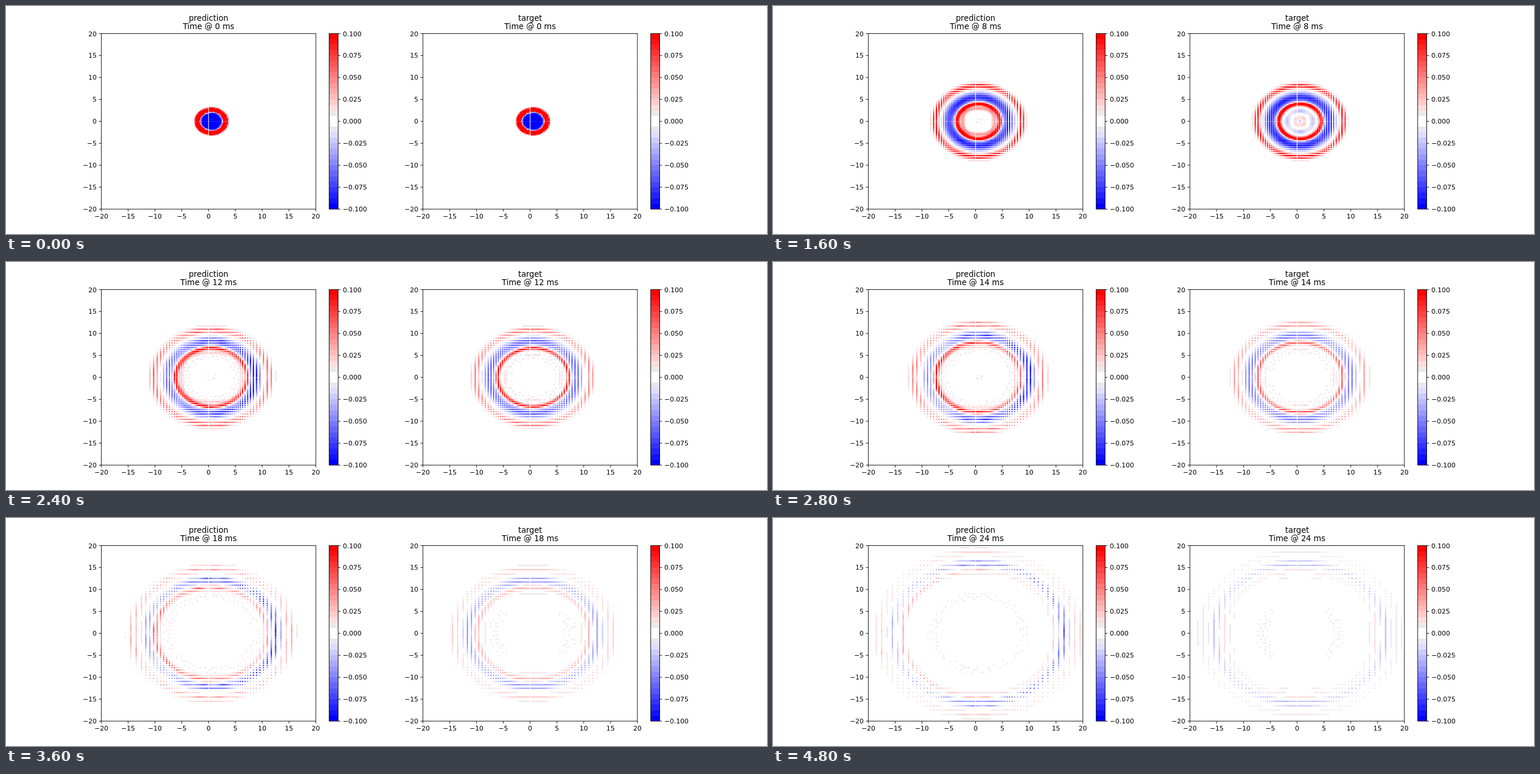
An HTML page with a canvas for the animation above (5 s loop, 1280 by 384 pixels).

```html
<!DOCTYPE html>
<html lang="en">
<head>
<meta charset="utf-8">
<title>Wave field: prediction and target</title>
<style>
  html, body { margin: 0; width: 100%; height: 100%; overflow: hidden; background: #fff; }
  canvas, svg { position: absolute; left: 0; top: 0; width: 1280px; height: 384px; }
  text { font-family: "DejaVu Sans", sans-serif; font-size: 11.05px; fill: #000; }
  .title { font-size: 13.26px; text-anchor: middle; }
  .line { fill: none; stroke: #000; stroke-width: .9; }
</style>
</head>
<body>
<canvas id="field" width="1280" height="384"></canvas>
<svg id="frame" viewBox="0 0 1280 384"></svg>
<script>
const STEP = 200, STEPS = 25;
const TOP = 46.4, HEIGHT = 295.7, WIDTH = 360.8;
const BANDS = 16, BAND = 0.1 / BANDS, DOT = 1.25;
const CX = 0.55;
const panels = [
  { name: 'prediction', left: 160.3, bar: 543.5, field: predicted },
  { name: 'target', left: 701.2, bar: 1084.3, field: simulated }
];

const ctx = document.getElementById('field').getContext('2d');
const svg = document.getElementById('frame');
const { exp, sin, cos, abs, min, max, hypot, atan2, sign, pow, floor } = Math;

const px = (p, x) => p.left + (x + 20) / 40 * WIDTH;
const py = y => TOP + (20 - y) / 40 * HEIGHT;
const bell = (d, w) => exp(-(d / w) * (d / w));

// Graded axis: fine cells in the middle, unit cells outside.
function gradedAxis() {
  const half = [];
  for (let x = 19.5; x > 12; x--) half.push(x);
  let x = 12.5, gap = 0.8;
  while (x - gap > 0) {
    x -= gap;
    half.push(x);
    gap = max(0.2, gap * 0.94);
  }
  return [...half.map(v => -v), ...half.reverse()];
}
const axis = gradedAxis();

// Amplitudes at every fourth time unit, blended geometrically.
const OUTER = [0.6, 0.25, 0.1, 0.055, 0.032, 0.019, 0.0125];
const TROUGH = [1.2, 0.5, 0.092, 0.064, 0.046, 0.035, 0.028];
const INNER = [0.6, 0.6, 0.14, 0.105, 0.055, 0.03, 0.021];
function level(list, t) {
  const i = min(list.length - 2, floor(t / 4)), f = t / 4 - i;
  return pow(list[i], 1 - f) * pow(list[i + 1], f);
}

function waveAt(t) {
  const front = 2.6 + 0.7 * t - 0.0015 * t * t;
  return {
    t, front, crest: front - 4.1,
    outer: level(OUTER, t), trough: level(TROUGH, t), inner: level(INNER, t),
    outerW: min(0.9, 0.34 + 0.033 * t),
    innerW: t < 8 ? 0.6 - max(0, t - 4) * 0.045 : min(0.65, 0.42 + max(0, t - 12) * 0.03)
  };
}

function speckle(x, y, k) {
  return sin(4.1 * x + k + 2 * sin(1.3 * y + k)) * sin(3.7 * y - k + 2 * sin(1.1 * x));
}
const spot = (n, env) => abs(n) * env > 0.66 ? 0.009 * sign(n) : 0;

function simulated(x, y, w) {
  const dx = x - CX, r = hypot(dx, y), a = atan2(y, dx), t = w.t;
  const s = r - w.front;
  const four = 0.5 + 0.5 * cos(4 * a);
  let v = w.outer * bell(s, w.outerW)
    - w.trough * bell(s + 2.55, 1.1)
    + w.inner * bell(r - w.crest, w.innerW);
  if (t > 5) {
    const mid = bell(t - 8, 1.8);
    v -= mid * 0.026 * bell(r - 2.4, 0.45) * (0.4 + 0.6 * four);
    v += mid * 0.024 * bell(r - 0.9, 0.35) * (0.4 + 0.6 * abs(sin(2 * a)));
    v -= mid * 0.035 * bell(r, 0.28);
  }
  if (t > 9) {
    v += 0.0115 * bell(r - w.crest + 1.5, 0.35) * four;
    const side = t > 17 ? min(1, abs(cos(a)) * 1.25) : 1;
    const env = bell(r - min(7, w.crest - 1.5), 2) * side;
    v += spot(speckle(abs(dx), abs(y), t), env);
  }
  return v;
}

function predicted(x, y, w) {
  const dx = x - CX, r = hypot(dx, y), t = w.t;
  const s = r - w.front, c = r ? dx / r : 0;
  const late = max(0, t - 8), gain = 1 + 0.035 * late;
  const skew = min(1, late / 6);
  const rough = 1 + 0.35 * min(1, late / 10) * sin(1.7 * x + 0.9 * sin(y) + t) * sin(1.3 * y - t);
  let v = gain * rough * (
    w.outer * bell(s, w.outerW * (1 + 0.009 * t))
    - w.trough * (1 + 0.35 * c * skew) * bell(s + 2.55, 1.1)
    + w.inner * (1 - 0.2 * c * skew) * bell(r - w.crest, w.innerW));
  v += 0.4 * bell(t - 4, 0.9) * bell(r, 0.6);
  if (t > 5) {
    const box = pow(pow(abs(dx), 2.7) + pow(abs(y), 2.7), 1 / 2.7);
    v += 0.04 * exp(-0.15 * (t - 8)) * min(1, (t - 5) / 3) * bell(box - w.crest + 1.05, 0.35);
    const core = t < 15 ? bell(r, 1.5) : 0;
    const wake = t > 9 ? bell(r - min(8.5, w.crest - 1.5), 1.7) : 0;
    v += abs(spot(speckle(x, y, t), max(core, wake)));
  }
  return v;
}

function bandColor(k, positive) {
  if (k === 0) return '#fff';
  if (k === 1) return positive ? '#f1e6ea' : '#eae6f1';
  const g = Math.round(255 * (1 - k / (BANDS - 1)));
  return positive ? `rgb(255,${g},${g})` : `rgb(${g},${g},255)`;
}

function drawPanel(p, w) {
  const paths = {};
  for (const x of axis) for (const y of axis) {
    const v = p.field(x, y, w);
    const k = min(BANDS - 1, floor(abs(v) / BAND));
    if (k === 0) continue;
    const color = bandColor(k, v > 0);
    const path = paths[color] || (paths[color] = new Path2D());
    const X = px(p, x), Y = py(y);
    path.moveTo(X + DOT, Y);
    path.arc(X, Y, DOT, 0, 7);
  }
  ctx.save();
  ctx.beginPath();
  ctx.rect(p.left, TOP, WIDTH, HEIGHT);
  ctx.clip();
  for (const color in paths) {
    ctx.fillStyle = color;
    ctx.fill(paths[color]);
  }
  ctx.restore();
}

function add(tag, attrs, label) {
  const el = document.createElementNS('http://www.w3.org/2000/svg', tag);
  for (const key in attrs) el.setAttribute(key, attrs[key]);
  if (label !== undefined) el.textContent = label;
  return svg.appendChild(el);
}
const text = (x, y, label, attrs) => add('text', { x, y, ...attrs }, label);
const signed = s => String(s).replace('-', '\u2212');

function buildPanel(p) {
  const bottom = TOP + HEIGHT, mid = p.left + WIDTH / 2;
  text(mid, 24.9, p.name, { class: 'title' });
  p.clock = text(mid, 39.2, '', { class: 'title' });

  let ticks = '';
  for (let v = -20; v <= 20; v += 5) {
    const X = px(p, v), Y = py(v);
    ticks += `M${X} ${bottom}v3.9M${p.left} ${Y}h-3.9`;
    text(X, 358.4, signed(v), { 'text-anchor': 'middle' });
    text(p.left - 7.7, Y + 4.1, signed(v), { 'text-anchor': 'end' });
  }

  const barW = 15.2, bandH = HEIGHT / (2 * BANDS);
  for (let i = 0; i < 2 * BANDS; i++) {
    const positive = i < BANDS, k = positive ? BANDS - 1 - i : i - BANDS;
    add('rect', {
      x: p.bar, y: TOP + i * bandH, width: barW, height: bandH,
      fill: bandColor(k, positive), 'shape-rendering': 'crispEdges'
    });
  }
  for (let i = -4; i <= 4; i++) {
    const Y = py(i * 5);
    ticks += `M${p.bar + barW} ${Y}h3.9`;
    text(p.bar + barW + 7.7, Y + 4.1, signed((i * 0.025).toFixed(3)));
  }
  add('path', { d: ticks, class: 'line' });
  add('rect', { x: p.left, y: TOP, width: WIDTH, height: HEIGHT, class: 'line' });
  add('rect', { x: p.bar, y: TOP, width: barW, height: HEIGHT, class: 'line' });
}

let shown = -1;
function render(ms) {
  const t = floor(ms / STEP) % STEPS;
  if (t === shown) return;
  shown = t;
  ctx.clearRect(0, 0, 1280, 384);
  const wave = waveAt(t);
  for (const p of panels) {
    p.clock.textContent = `Time @ ${t} ms`;
    drawPanel(p, wave);
  }
}

panels.forEach(buildPanel);
const start = performance.now();
function loop() {
  render(performance.now() - start);
  requestAnimationFrame(loop);
}
loop();
</script>
</body>
</html>
```
